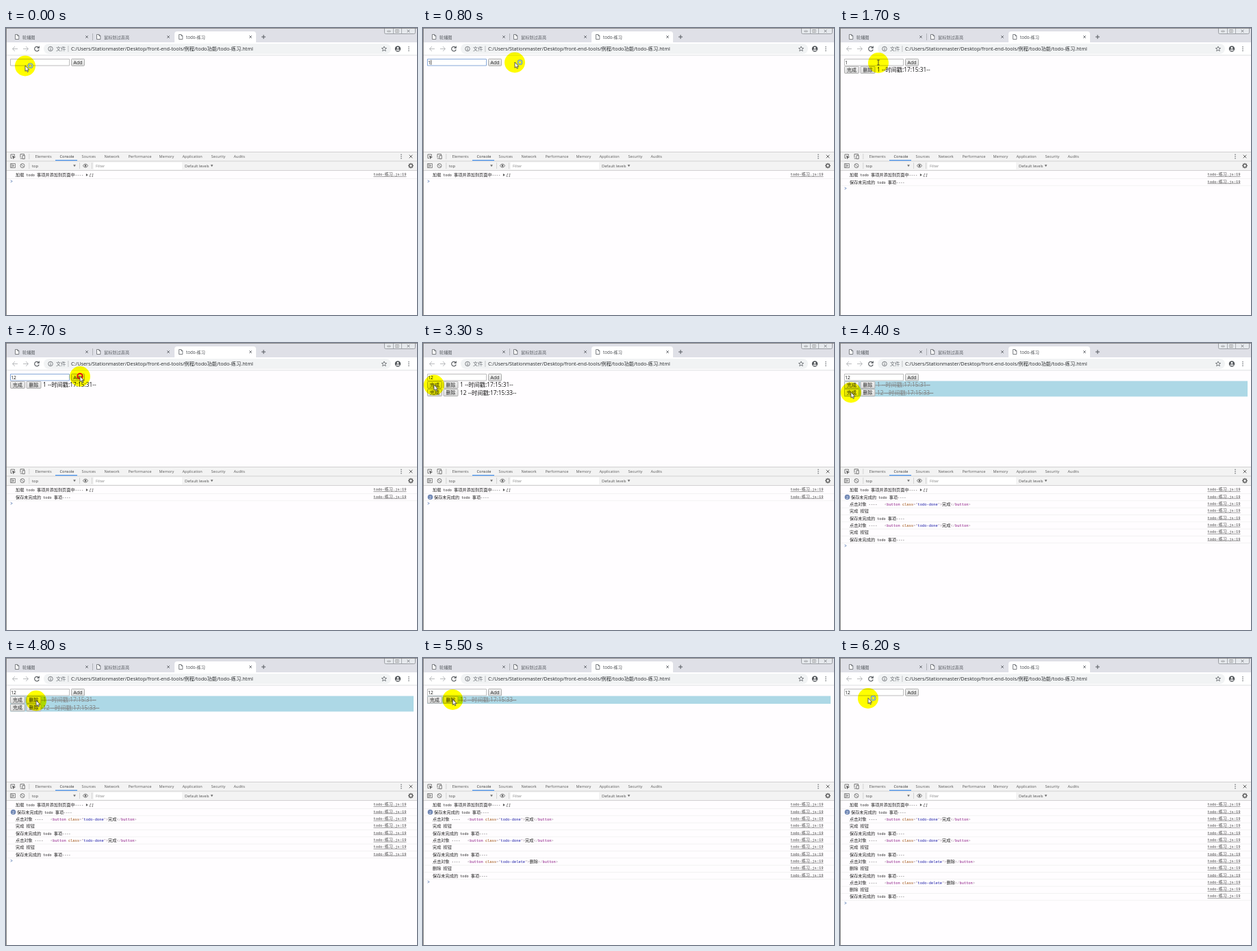
Write an HTML page with a canvas that moves like this. It is 600 by 420 pixels and loops after 7 s.

```html
<!DOCTYPE html>
<html lang="zh">
<head>
<meta charset="utf-8">
<title>todo</title>
<style>
html, body { margin: 0; width: 600px; height: 420px; overflow: hidden; background: #fff }
canvas { display: block }
</style>
</head>
<body>
<canvas id="stage" width="600" height="420"></canvas>
<script>
const c = document.getElementById('stage').getContext('2d');
const SANS = '"Open Sans", "Noto Sans CJK SC", "Noto Sans", sans-serif';
const MONO = '"Liberation Mono", monospace';
const CJK = '"Noto Sans CJK SC", sans-serif';
const LOOP = 7000, STEP = 100, LAST = 6200, ROW = 10.33;

function rect(x, y, w, h, color) {
  c.fillStyle = color;
  c.fillRect(x, y, w, h);
}
function box(x, y, w, h, r, fill, stroke) {
  c.beginPath();
  c.roundRect(x, y, w, h, r);
  if (fill) { c.fillStyle = fill; c.fill(); }
  if (stroke) { c.strokeStyle = stroke; c.lineWidth = 1; c.stroke(); }
}
function disc(x, y, r, fill, stroke, width = 1) {
  c.beginPath();
  c.arc(x, y, r, 0, 7);
  if (fill) { c.fillStyle = fill; c.fill(); }
  if (stroke) { c.strokeStyle = stroke; c.lineWidth = width; c.stroke(); }
}
// Strokes an SVG path placed at x, y
function icon(d, x, y, color = '#5f6368', width = 1, fill) {
  const p = new Path2D(d);
  c.save();
  c.translate(x, y);
  if (fill) { c.fillStyle = fill; c.fill(p); }
  c.strokeStyle = color;
  c.lineWidth = width;
  c.stroke(p);
  c.restore();
}
function text(s, x, y, size, color = '#333') {
  c.font = `${size}px ${SANS}`;
  c.fillStyle = color;
  c.fillText(s, x, y);
  return x + c.measureText(s).width;
}
// Monospaced text whose Latin letters are half as wide as the Chinese ones
function mono(s, x, y, color = '#222', size = 5.17, style = '') {
  c.fillStyle = color;
  for (const run of s.match(/[\x20-\x7e]+|[^\x20-\x7e]+/g)) {
    c.font = run < '\x7f' ? `${style} ${size}px ${MONO}` : `6.2px ${CJK}`;
    c.fillText(run, x, y);
    x += c.measureText(run).width;
  }
  return x;
}
function dots(x, y) {
  for (const d of [-2.7, 0, 2.7]) disc(x, y + d, 0.8, '#5f6368');
}
function triangle(x, y) {
  icon('M-1.6-1.3H1.6L0 1.5Z', x, y, '#666', 0.2, '#666');
}

const CROSS = 'M-1.8-1.8L1.8 1.8M1.8-1.8L-1.8 1.8';

function drawTab(x, title, active) {
  if (active) box(x - 6, 5, 119, 18, [4, 4, 0, 0], '#fff');
  icon('M-2.5-3.5H.8L2.8-1.5V3.5H-2.5ZM.8-3.5V-1.5H2.8', x + 3, 13, '#5f6368', 0.8, '#fff');
  text(title, x + 11, 15.5, 6.2, active ? '#45494d' : '#55595e');
  icon(CROSS, x + 105, 13, '#5f6368', 0.9);
}

function drawBrowser() {
  rect(0, 0, 600, 420, '#fffdff');
  rect(0, 21, 600, 19, '#fff');
  rect(0, 0, 600, 21, '#dfe0e7');
  drawTab(13, '轮播图');
  drawTab(132, '鼠标划过高亮');
  drawTab(252, 'todo-练习', true);
  rect(126, 8, 0.8, 10, '#a5a9af');
  icon('M-3 0H3M0-3V3', 376, 13, '#55595e', 1);
  box(552.5, -3, 45, 11.5, 2, '#e6e9ed', '#9a9da3');
  rect(565, 0, 0.8, 8, '#9a9da3');
  rect(577, 0, 0.8, 8, '#9a9da3');
  icon('M-2 0H2V1.6H-2Z', 559, 4, '#85888d', 0.7, '#fff');
  icon('M-2.2-2H2.2V2H-2.2ZM-.8-.5H.8V.5H-.8Z', 571, 4.5, '#85888d', 0.7, '#fff');
  icon(CROSS, 587.5, 4.5, '#777a80', 1);

  icon('M4 0H-3.5M0-3.5L-3.5 0L0 3.5', 13, 30.5, '#b9bbbe');
  icon('M-4 0H3.5M0-3.5L3.5 0L0 3.5', 29, 30.5, '#b9bbbe');
  icon('M2.7-1.8A3.3 3.3 0 1 0 3.2 1M3.3-4V-1.2H.5', 45, 30.5, '#4f5358', 1.1);
  box(55, 23, 507, 15, 7.5, '#f1f3f4');
  disc(65, 30.5, 3.3, null, '#5f6368', 0.8);
  rect(64.6, 30, 0.9, 2.6, '#5f6368');
  rect(64.6, 28.4, 0.9, 0.9, '#5f6368');
  text('文件', 73, 33, 7.2, '#6a6e73');
  rect(90.5, 26, 0.8, 9, '#b5b8bc');
  text('C:/Users/Stationmaster/Desktop/front-end-tools/例程/todo功能/todo-练习.html', 95, 33, 7.25, '#26282b');
  icon('M0-3.6L1-1.2L3.6-1L1.6.7L2.3 3.2L0 1.8L-2.3 3.2L-1.6.7L-3.6-1L-1-1.2Z', 552, 30.5, '#5f6368', 0.8);
  disc(572, 30.5, 4.2, '#505458');
  disc(572, 29.2, 1.4, '#fff');
  box(569.5, 31.5, 5, 1.8, 0.9, '#fff');
  dots(588, 30.5);
  rect(0, 39.5, 600, 0.8, '#d5d7da');
}

const TABS = [['Elements', 42], ['Console', 78], ['Sources', 110], ['Network', 143], ['Performance', 178],
  ['Memory', 223], ['Application', 257], ['Security', 299], ['Audits', 332]];

function drawDevtools() {
  rect(0, 181, 600, 27.5, '#f3f3f3');
  for (const y of [181, 194.5, 208]) rect(0, y, 600, 0.8, '#c9c9c9');
  icon('M2.5-1V-3H-3V2.5H-1', 10, 188, '#6e6e6e', 0.9);
  icon('M-.5-.8L3.5.8L1.6 1.6L.8 3.5Z', 10, 188, '#555', 0.6, '#555');
  icon('M-3 1.5V-3.5H2.5V-2M-3.2 3H-.5M0-1.5H3.3V3.5H0Z', 24, 188, '#6e6e6e', 0.9);
  rect(33.5, 184, 0.8, 8, '#ccc');
  for (const [name, x] of TABS) text(name, x + 0.5, 190.4, 5.6, name === 'Console' ? '#333' : '#5a5a5a');
  rect(72, 193, 32, 1.2, '#3d8bea');
  dots(577, 188);
  icon('M-2.3-2.3L2.3 2.3M2.3-2.3L-2.3 2.3', 591, 188, '#555', 0.9);

  icon('M-3.5-3H3.5V3H-3.5ZM-1.7-3V3M0-1.5L2 0L0 1.5Z', 10, 201.5, '#6e6e6e', 0.8);
  disc(24, 201.5, 3, null, '#6e6e6e', 0.9);
  icon('M-2-2L2 2', 24, 201.5, '#6e6e6e', 0.9);
  for (const x of [33.5, 107, 125]) rect(x, 197, 0.8, 9, '#ccc');
  text('top', 38, 203.5, 5.7, '#444');
  triangle(100, 201.5);
  icon('M-3.8 0Q0-5 3.8 0Q0 5-3.8 0Z', 116, 201.5, '#666', 0.9);
  disc(116, 201.5, 1.3, '#555');
  rect(128, 196.5, 129, 10.5, '#fff');
  text('Filter', 131, 203.8, 5.7, '#888');
  text('Default levels', 261, 203.5, 5.7, '#555');
  triangle(300.5, 201.5);
  disc(591, 201.5, 2.4, null, '#666', 1.5);
  for (let a = 0; a < 8; a++)
    disc(591 + 3.4 * Math.cos(a * Math.PI / 4), 201.5 + 3.4 * Math.sin(a * Math.PI / 4), 0.7, '#666');
}

const items = [
  { label: '1 --时间戳:17:15:31--', added: 1300, done: 3500, removed: 5200 },
  { label: '12 --时间戳:17:15:33--', added: 2800, done: 4300, removed: 5900 }
];
const SAVE = '保存未完成的 todo 事项----';
const logs = [[0, '加载 todo 事项并添加到页面中----'], [1300, SAVE]];
const addLogs = (time, kind, word) =>
  logs.push([time, '点击对象 ----', kind, word], [time, word + ' 按钮'], [time, SAVE]);
for (const i of items) addLogs(i.done, 'todo-done', '完成');
for (const i of items) addLogs(i.removed, 'todo-delete', '删除');

function drawLogs(t) {
  const shown = logs.filter(l => l[0] <= t);
  shown.forEach(([, message, kind, word], i) => {
    const y = 217.2 + i * ROW;
    const counted = i === 1 && t >= items[1].added;
    let x = mono(message, counted ? 16 : 14, y);
    if (i === 0) {
      icon('M-1-1.8L1.6 0L-1 1.8Z', 118, y - 2.2, '#555', 0.2, '#555');
      mono('[]', 121.5, y, '#222', 5.4, 'italic');
    }
    if (counted) {
      disc(10.6, y - 2, 3.8, '#7188b5');
      text('2', 9.1, y, 5.4, '#fff');
    }
    if (kind) {
      x = 65;
      for (const [s, color] of [['<', '#a894a6'], ['button', '#881280'], [' class', '#994500'], ['="', '#a894a6'],
        [kind, '#1a1aa6'], ['">', '#a894a6'], [word, '#222'], ['</', '#a894a6'], ['button', '#881280'], ['>', '#a894a6']])
        x = mono(s, x, y, color, 5.4);
    }
    const end = mono('todo-练习.js:19', 536.5, y - 1, '#444', 5.4);
    rect(536.5, y, end - 536.5, 0.6, '#666');
    rect(1, y + 2.9, 599, 0.8, '#efefef');
  });
  icon('M-1.3-1.5L1.3 0L-1.3 1.5', 8, 214 + shown.length * ROW, '#5f7fb5', 0.8);
}

function button(label, x, y, w) {
  const g = c.createLinearGradient(0, y, 0, y + 10.5);
  g.addColorStop(0, '#f4f4f4');
  g.addColorStop(1, '#dcdcdc');
  box(x + 0.5, y + 0.5, w - 1, 10, 1, g, '#adadad');
  c.textAlign = 'center';
  text(label, x + w / 2, y + 8, 6.9, '#222');
  c.textAlign = 'left';
}

const between = (t, a, b) => t >= a && t < b;

function drawPage(t) {
  const focused = between(t, 300, 1200) || between(t, 1900, 2800);
  box(6.5, 45.5, 86, 9.5, 0, '#fff', focused ? '#86a8d8' : '#bcbcbc');
  const value = t < 500 ? '' : t < 2200 ? '1' : '12';
  const end = text(value, 7.3, 52.8, 6.7, '#111');
  if (focused && t < 1200) rect(end + 0.3, 46.8, 0.8, 7, '#222');
  button('Add', 95, 44.8, 20);

  items.filter(i => between(t, i.added, i.removed)).forEach((item, n) => {
    const y = 55.6 + n * 11.4, done = t >= item.done;
    if (done) rect(6, y, 589, 11.4, '#add8e6');
    button('完成', 6, y + 0.2, 22);
    button('删除', 29.5, y + 0.2, 22);
    const end = text(item.label, 54, y + 8.8, 8.3, done ? '#808080' : '#111');
    if (done) rect(51.5, y + 5.9, end - 51.5, 0.8, '#808080');
  });
}

// Pointer stops: time, x, y
const path = [[0, 28, 55], [500, 40, 52], [800, 134, 50], [1000, 120, 49], [1200, 106, 49], [1400, 104, 49],
  [1700, 56, 50.5], [2100, 56, 50.5], [2400, 118, 50], [2700, 108, 48.5], [2900, 106, 49], [3200, 16, 61],
  [3900, 16, 61.5], [4200, 16, 72], [4500, 16, 72], [4800, 44, 62], [5300, 44, 61], [6200, 41, 58.5]];
const clicks = [1200, 2700, 3400, 4200, 5100, 5800];

function drawPointer(t) {
  const n = Math.max(1, path.findIndex(p => p[0] >= t));
  const [t0, x0, y0] = path[n - 1], [t1, x1, y1] = path[n];
  const k = (t - t0) / (t1 - t0);
  const x = x0 + (x1 - x0) * k, y = y0 + (y1 - y0) * k;
  c.globalCompositeOperation = 'multiply';
  disc(x, y + 0.5, 15, '#ff0');
  c.globalCompositeOperation = 'source-over';
  if (clicks.includes(t)) disc(x, y, 3.7, null, '#e81010', 2);
  if (between(t, 1600, 2200)) {
    icon('M-1.8-3.5H1.8M0-3.5V3.5M-1.8 3.5H1.8', x, y, '#333', 0.9);
    return;
  }
  icon('M0 0V8.3L1.9 6.6L3.2 9.4L4.5 8.8L3.3 6.2H5.8Z', x, y, '#333', 0.8, '#fff');
  if (t < 1000 || t >= 6000) {
    disc(x + 7.5, y + 0.3, 3, null, '#5f9098', 2);
    disc(x + 7.5, y + 0.3, 3, null, '#c5e5dc', 0.8);
  }
}

function draw(now) {
  const t = Math.min(LAST, Math.floor(now % LOOP / STEP) * STEP);
  drawBrowser();
  drawDevtools();
  drawLogs(t);
  drawPage(t);
  drawPointer(t);
  rect(0, 0, 0.9, 420, '#777');
  rect(0, 0, 600, 0.8, '#777');
}

const start = performance.now();
function tick() {
  draw(performance.now() - start);
  requestAnimationFrame(tick);
}
tick();
</script>
</body>
</html>
```
